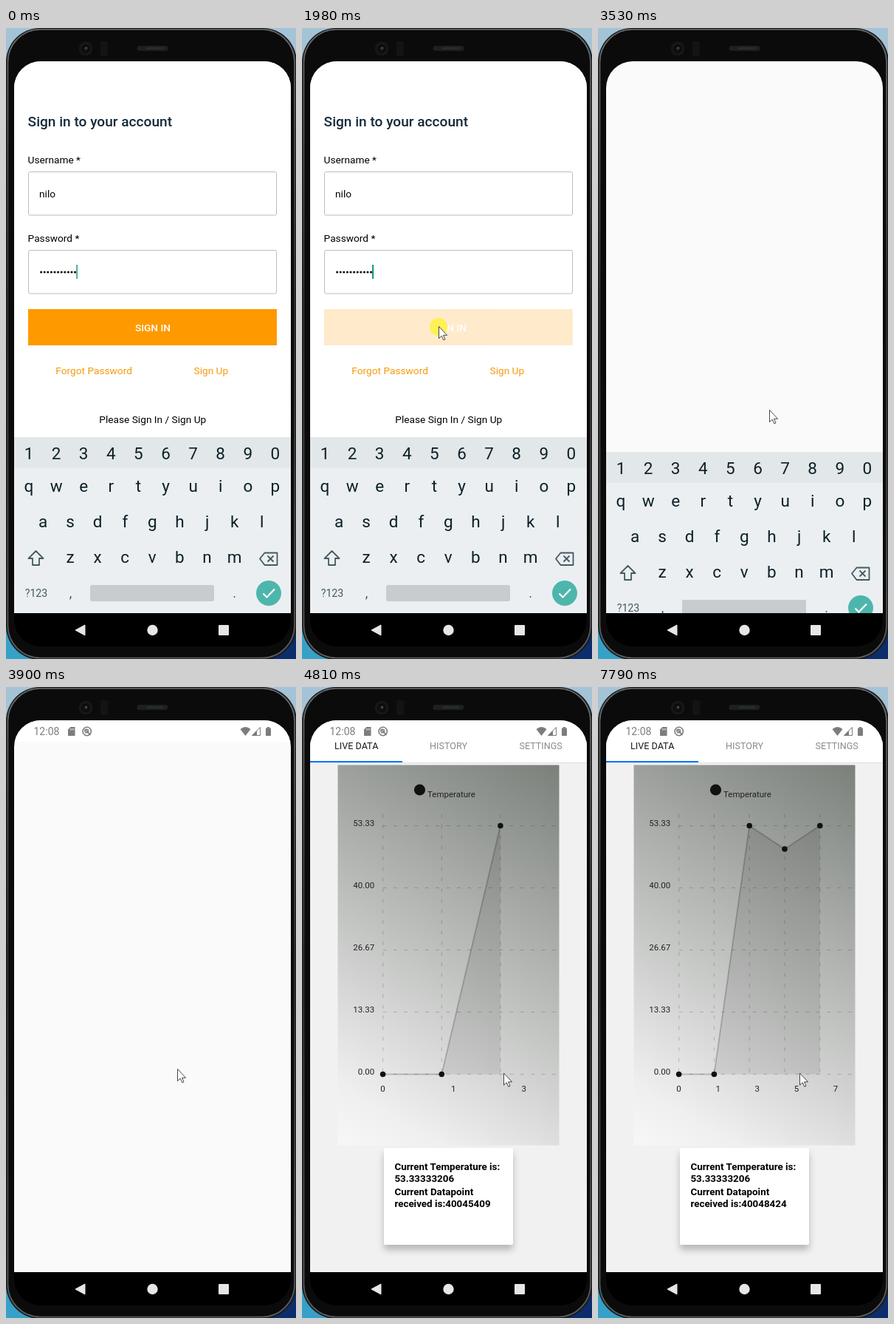
An HTML page that plays this animation: 393x853 px, repeating every 8 s.

```html
<!DOCTYPE html>
<html lang="en">
<head>
<meta charset="utf-8">
<title>Live temperature app</title>
<style>
  html, body { margin: 0; width: 100%; height: 100%; overflow: hidden; background: #000; }
  svg { display: block; width: 393px; height: 853px; }
  text { font-family: Roboto, sans-serif; font-size: 13.7px; white-space: pre; }
</style>
</head>
<body>
<svg id="stage" viewBox="0 0 393 853" xmlns="http://www.w3.org/2000/svg"></svg>
<script>
const LOOP = 8000;

const attrs = o => Object.entries(o).map(([k, v]) => ` ${k}="${v}"`).join('');
const text = (x, y, s, o = {}) => `<text x="${x}" y="${y}"${attrs(o)}>${s}</text>`;
const rect = (x, y, width, height, fill, o = {}) =>
  `<rect${attrs({ x, y, width, height, fill, ...o })}/>`;
const circle = (cx, cy, r, fill, o = {}) => `<circle${attrs({ cx, cy, r, fill, ...o })}/>`;
const path = (d, o = {}) => `<path${attrs({ d, fill: 'none', ...o })}/>`;
const group = (id, body, o = {}) => `<g${attrs({ id, ...o })}>${body}</g>`;
const mid = { 'text-anchor': 'middle' };

const defs = `<defs>
  <linearGradient id="wall" x1="0" y1="0" x2="0" y2="1">
    <stop offset=".3" stop-color="#a4c3d6"/><stop offset=".9" stop-color="#37a0c6"/>
  </linearGradient>
  <linearGradient id="edge" x1="0" y1="0" x2="0" y2="1">
    <stop offset="0" stop-color="#6a6d6f"/><stop offset=".45" stop-color="#2e3032"/>
    <stop offset="1" stop-color="#5c5f61"/>
  </linearGradient>
  <linearGradient id="paper" gradientUnits="userSpaceOnUse" x1="48.5" y1="619" x2="349" y2="105">
    <stop offset="0" stop-color="#f7f7f7"/><stop offset=".12" stop-color="#efefef"/>
    <stop offset="1" stop-color="#7b807b"/>
  </linearGradient>
  <linearGradient id="fade" gradientUnits="userSpaceOnUse" x1="0" y1="187" x2="0" y2="523">
    <stop offset="0" stop-opacity=".11"/><stop offset="1" stop-opacity=".085"/>
  </linearGradient>
  <filter id="shadow" x="-20%" y="-20%" width="140%" height="150%">
    <feDropShadow dx="0" dy="7" stdDeviation="5" flood-opacity=".24"/>
  </filter>
  <clipPath id="screen"><path d="M11 791V81A36 36 0 0 1 47 45H350A36 36 0 0 1 386 81V791Z"/></clipPath>
</defs>`;

function phone() {
  return rect(0, 0, 393, 853, 'url(#wall)') +
    rect(300, 760, 93, 93, '#0c2c6c') +
    rect(0, 0, 394, 854, '#1b1c1e', { rx: 46 }) +
    rect(2.5, 2, 388.5, 849.5, '#0b0b0c', { rx: 44, stroke: 'url(#edge)', 'stroke-width': 1.6 }) +
    circle(108, 28, 9.5, '#161718') + circle(108, 28, 6, '#0c0d0e') +
    circle(108, 28, 2.4, '#23272a') + circle(109, 27, .9, '#6f7478') +
    rect(128, 18, 10, 20, '#131415', { rx: 3 }) +
    rect(177.5, 24, 42, 7, '#1d1f20', { rx: 3.5 }) +
    rect(190, 26, 24, 3, '#272c2e', { rx: 1.5 });
}

function navBar() {
  const fill = '#e6e6e6';
  return path('M11 791H386V800A36 36 0 0 1 350 836H47A36 36 0 0 1 11 800Z', { fill: '#000' }) +
    path('M94 814L107 807V821Z', { fill, stroke: fill, 'stroke-linejoin': 'round' }) +
    circle(198.5, 814, 7.2, fill) + rect(288, 807, 14, 14, fill, { rx: 1 });
}

function signIn() {
  const box = y => rect(30.5, y, 336, 58.5, '#fff', { rx: 2, stroke: '#bcbcbc' });
  const link = { fill: '#f59a0c' };
  const dots = Array.from({ length: 11 }, (_, i) => circle(47.6 + 4.6 * i, 330, 1.6, '#111')).join('');
  return text(29.6, 132.5, 'Sign in to your account',
      { fill: '#152939', 'font-weight': 500, style: 'font-size:19.1px' }) +
    text(29.6, 183, 'Username *') + box(194.5) + text(45, 229, 'nilo') +
    text(29.6, 289, 'Password *') + box(300.5) + dots +
    rect(95.2, 320, 1.8, 19, '#00897b', { id: 'caret' }) +
    group('button', rect(30, 380, 337, 49, '#f90') +
      text(199, 410, 'SIGN IN', { ...mid, fill: '#fff', 'font-weight': 500 })) +
    text(67.3, 468, 'Forgot Password', link) + text(254.5, 468, 'Sign Up', link) +
    text(198.8, 534, 'Please Sign In / Sign Up', mid);
}

function keyboard() {
  const row = (keys, x, y) => [...keys].map((k, i) =>
    text(x + 37.1 * i, y, k, { ...mid, fill: '#0d2027', style: 'font-size:22.5px' })).join('');
  const line = { stroke: '#455a60', 'stroke-width': 1.8, 'stroke-linejoin': 'round' };
  const small = { ...mid, fill: '#455a60', style: 'font-size:14.2px' };
  return rect(11, 553, 375, 238, '#ebeff2') + rect(11, 553, 375, 42, '#e2e7e9') +
    row('1234567890', 31, 583) + row('qwertyuiop', 31, 627) +
    row('asdfghjkl', 50, 675) + row('zxcvbnm', 87, 723) +
    path('M40.5 707L30.5 717H36V726H45V717H50.5Z', line) +
    path('M344 717.5L350.5 709.5H367.5V726H350.5Z', line) +
    path('M354.5 713.5L362.5 721.5M362.5 713.5L354.5 721.5', line) +
    text(41, 769, '?123', small) +
    text(87.5, 770, ',', { ...small, style: 'font-size:18px' }) +
    text(309.5, 770, '.', { ...small, style: 'font-size:18px' }) +
    rect(114, 753, 168, 22, '#c8ccce', { rx: 2 }) +
    circle(356, 764, 17, '#4db6ac') +
    path('M348.5 764.5L353.5 769.5L364 758.5', { stroke: '#fff', 'stroke-width': 2.2 });
}

function statusBar() {
  const c = '#7c7c7c';
  return rect(11, 45, 375, 29, '#fff') +
    text(37.5, 65.3, '12:08', { fill: c, style: 'font-size:14px' }) +
    path('M87.5 54H93.5V66H84V57.5Z', { fill: c }) +
    path('M87.5 56V58.5M89.5 56V58.5M91.5 56V58.5', { stroke: '#fff', 'stroke-width': .8 }) +
    circle(109.7, 60, 5.7, 'none', { stroke: c, 'stroke-width': 1.6 }) +
    circle(109.2, 59.5, 2.4, 'none', { stroke: c, 'stroke-width': 1.4 }) +
    path('M107 57L114.5 64.8', { stroke: c, 'stroke-width': 1.8 }) +
    path('M317.5 57Q324.5 51 331.5 57L324.5 66Z', { fill: c }) +
    path('M333.5 65.5L344.5 54.5V65.5Z', { stroke: c }) +
    path('M333.5 65.5L340 59V65.5Z', { fill: c }) +
    path('M352 55.5H354V54H357V55.5H359V66H352Z', { fill: c });
}

function tabs() {
  const tab = (x, s, fill) => text(x, 84.2, s, { ...mid, fill, style: 'font-size:12.6px' });
  return rect(11, 74, 375, 717, '#f1f1f1') + rect(11, 102, 375, 1, '#dedede') +
    rect(11, 73, 375, 29, '#fff') + rect(11, 100, 125, 2, '#0a74ff') +
    tab(73.7, 'LIVE DATA', '#1c1c1e') + tab(198.5, 'HISTORY', '#8b8b8c') +
    tab(323.6, 'SETTINGS', '#8b8b8c');
}

// Chart geometry
const LEFT = 109.6, WIDE = 239, TOP = 187.5, BASE = 523.5, PEAK = 160 / 3;
const SECONDS = [0, 1, 3, 5, 7];
const tiny = 'font-size:11.5px';

function chart(data) {
  const n = data.length, max = Math.max(...data);
  const rows = max ? 4 : 1;
  const px = i => LEFT + WIDE / n * i;
  const py = v => BASE - (BASE - TOP) * v / (max || 1);
  const pts = data.map((v, i) => `${px(i)} ${py(v)}`);
  let grid = '', labels = '';
  for (let i = 0; i <= rows; i++) {
    const y = BASE - (BASE - TOP) * i / rows;
    grid += `M${LEFT} ${y}H349`;
    if (i < rows || max) {
      labels += text(98.2, y + .6, (max * i / rows).toFixed(2), { 'text-anchor': 'end', style: tiny });
    }
  }
  data.forEach((_, i) => {
    grid += `M${px(i)} 172V${BASE}`;
    labels += text(LEFT + 2 * WIDE / (2 * n - 1) * i, 547, SECONDS[i], { ...mid, style: tiny });
  });
  return path(grid, { stroke: '#000', 'stroke-opacity': .2, 'stroke-dasharray': '4.78 9.55' }) +
    path(`M${pts.join('L')}L${px(n - 1)} ${BASE}H${LEFT}Z`, { fill: 'url(#fade)' }) +
    path(`M${pts.join('L')}`, { stroke: '#000', 'stroke-opacity': .2, 'stroke-width': 1.9 }) +
    data.map((v, i) => circle(px(i), py(v), 3.8, '#111')).join('') +
    group('labels', labels, { fill: '#222' });
}

function readout(temp, point) {
  const lines = ['Current Temperature is:', temp, 'Current Datapoint', 'received is:' + point];
  return lines.map((s, i) => text(125.4, [653, 669, 687, 703][i], s,
    { 'font-weight': 700, style: 'font-size:13.4px' })).join('');
}

const board = () =>
  rect(48.5, 105.5, 300, 514, 'url(#paper)') +
  circle(159.5, 139, 7.6, '#111') +
  text(170, 149, 'Temperature', { fill: '#222', style: tiny }) +
  group('plot', '') +
  rect(111, 623, 175, 131, '#fff', { rx: 2, filter: 'url(#shadow)' }) +
  group('values', '');

const arrow = path('M.5 .5V16.6L4.2 13.2L6.8 18.8L9 17.8L6.5 12.3H11.6Z',
  { fill: '#fff', stroke: '#333', 'stroke-width': .9, 'stroke-linejoin': 'round' });

const stage = document.getElementById('stage');
stage.innerHTML = defs + phone() +
  group('view', rect(11, 45, 375, 746, '#fafafa') +
    group('login', rect(11, 45, 375, 746, '#fff') + signIn()) +
    group('keys', keyboard()) +
    group('app', tabs() + board()) +
    group('status', statusBar()), { 'clip-path': 'url(#screen)' }) +
  navBar() + circle(185, 404, 12, '#fff04a', { id: 'tap', 'fill-opacity': .92 }) +
  group('mouse', arrow);

const el = {};
for (const node of stage.querySelectorAll('g[id], rect[id], circle[id]')) el[node.id] = node;

// Stepped tracks: [start, value]; each value holds until the next start.
const at = (track, t) => track.reduce((v, [start, next]) => t >= start ? next : v, track[0][1]);
const show = (node, on) => node.setAttribute('display', on ? 'inline' : 'none');

const caretAlpha = [[0, .75], [90, 0], [570, 1], [1070, 0], [1610, 1], [2080, 0], [2620, 1], [3080, 0]];
const buttonAlpha = [[0, 1], [1980, .2], [2160, .27], [2250, .36], [2350, .45], [2440, .5]];
const keysDrop = [[0, 0], [3450, 20], [3540, 100], [3630, 190], [3720, 240]];
const mouseStops = [[630, [185, 403]], [3080, [214, 470]], [3180, [232, 516]],
  [4630, [246, 518]], [4720, [263, 520]], [4810, [273, 521.5]]];
const feed = [
  [4000, [[0, 0], '0', '0']],
  [4810, [[0, 0, PEAK], '53.33333206', '40045409']],
  [5890, [[0, 0, PEAK], '53.33333206', '40046414']],
  [6800, [[0, 0, PEAK, PEAK - 5], '48.33333206', '40047419']],
  [7790, [[0, 0, PEAK, PEAK - 5, PEAK], '53.33333206', '40048424']]
];

function mousePos(t) {
  if (t >= 630) return at(mouseStops, t);
  const k = Math.floor((t - 90) / 90) / 6;
  const e = k * k * (3 - 2 * k);
  return [354 + (185 - 354) * e, 760 + (403 - 760) * e];
}

let shown = null;
function draw(t) {
  show(el.login, t < 3450);
  show(el.keys, t < 3720);
  show(el.status, t >= 3900);
  show(el.app, t >= 4000);
  show(el.tap, t >= 1980 && t < 2160);
  show(el.mouse, t >= 90);
  el.caret.setAttribute('opacity', at(caretAlpha, t));
  el.button.setAttribute('opacity', at(buttonAlpha, t));
  el.keys.setAttribute('transform', `translate(0 ${at(keysDrop, t)})`);
  el.mouse.setAttribute('transform', `translate(${mousePos(t)})`);
  const state = at(feed, t);
  if (state !== shown) {
    shown = state;
    el.plot.innerHTML = chart(state[0]);
    el.values.innerHTML = readout(state[1], state[2]);
  }
}

const begin = performance.now();
function tick() {
  draw((performance.now() - begin) % LOOP);
  requestAnimationFrame(tick);
}
tick();
</script>
</body>
</html>
```
